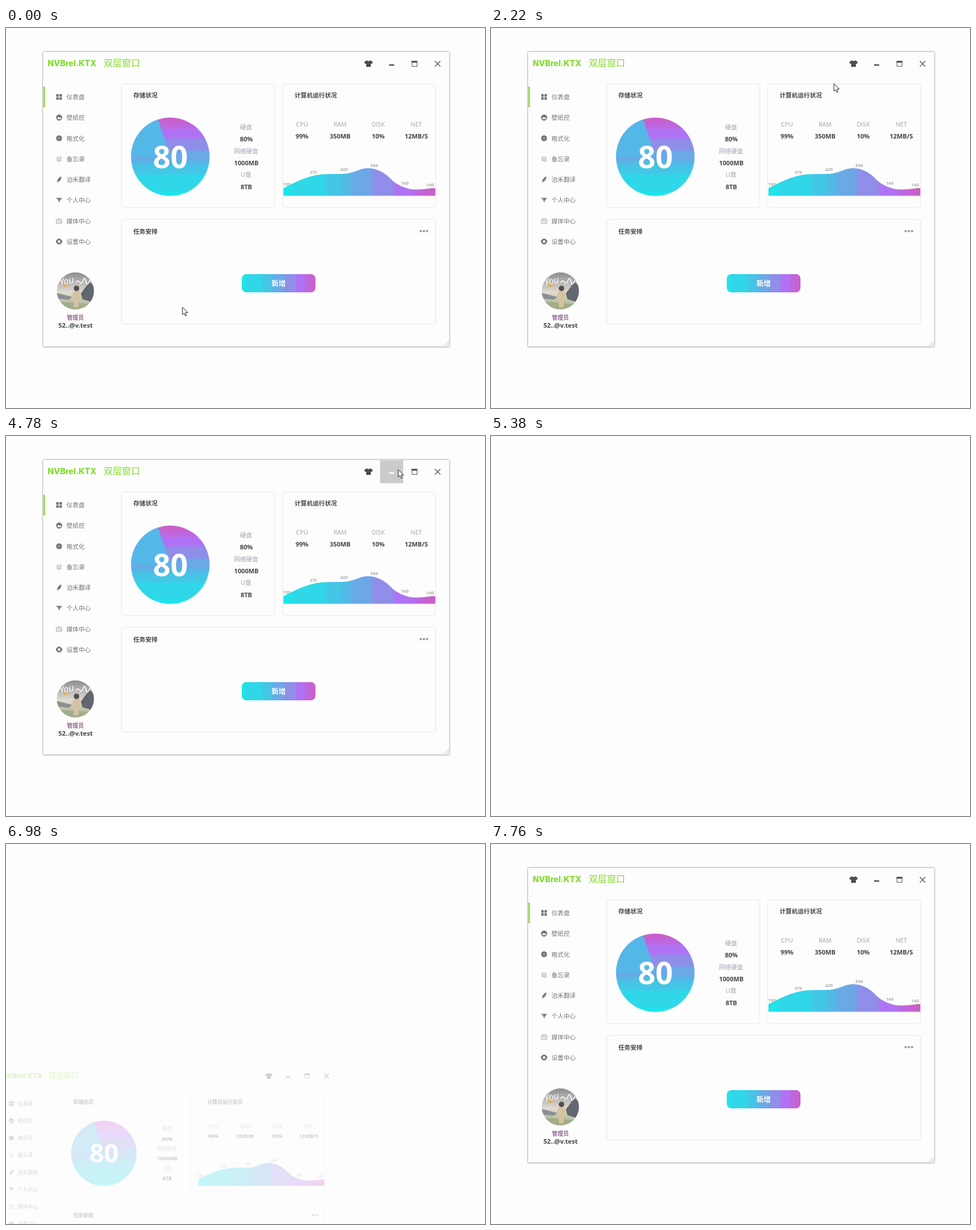
An HTML page that plays this animation: 839x667 px, repeating every 8 s.

```html
<!DOCTYPE html>
<html lang="zh-CN">
<head>
<meta charset="utf-8">
<title>Dashboard</title>
<style>
html, body { margin: 0; width: 100%; height: 100%; overflow: hidden; background: #fdfdfd; }
svg { display: block; width: 100%; height: 100%; }
text { font-family: 'Open Sans', 'Noto Sans CJK SC', 'Noto Sans CJK', sans-serif; }
.brand { font: 800 14.2px Inter, sans-serif; fill: #84db2f; }
.title { font-size: 16px; font-weight: 300; fill: #84db2f; }
.menu { font-size: 10.6px; fill: #747474; }
.head { font-size: 10.6px; font-weight: 700; fill: #444; }
.label { font-size: 10.6px; fill: #a2a2b2; text-anchor: middle; }
.value { font-size: 11px; font-weight: 700; fill: #444; text-anchor: middle; }
.tick { font-size: 7.8px; font-weight: 700; fill: #aaa; text-anchor: middle; }
.mid { text-anchor: middle; }
.ico { fill: #777; stroke: none; }
.line { fill: none; stroke: #999; stroke-width: .9; }
</style>
</head>
<body>
<svg id="stage" viewBox="0 0 839 667"></svg>
<script>
const stage = document.getElementById('stage');
const text = (x, y, s, cls, extra = '') => `<text x="${x}" y="${y}" class="${cls}" ${extra}>${s}</text>`;
const rect = (x, y, w, h, fill, extra = '') =>
  `<rect x="${x}" y="${y}" width="${w}" height="${h}" fill="${fill}" ${extra}/>`;
const circle = (x, y, r, fill) => `<circle cx="${x}" cy="${y}" r="${r}" fill="${fill}"/>`;
const path = (d, extra = '') => `<path d="${d}" ${extra}/>`;
const card = (x, y, w, h) => rect(x, y, w, h, '#fdfdfd', 'rx="5" stroke="#efeff0" stroke-width="1.6"');

// colour bands: [end, colour]
const bands = [
  [.06, '#1fe4e9'], [.28, '#2fd7e8'], [.39, '#44c6e6'], [.45, '#53b8e6'], [.58, '#6ba8e6'],
  [.73, '#8f8ee8'], [.857, '#b072f4'], [.936, '#c066dc'], [1, '#c960cb']
];
const stops = bands.map(([end, c], i) => {
  const from = i ? bands[i - 1][0] : 0;
  return `<stop offset="${from + .02}" stop-color="${c}"/><stop offset="${end - .02}" stop-color="${c}"/>`;
}).join('');

const defs = `<defs>
  <linearGradient id="across">${stops}</linearGradient>
  <linearGradient id="up" x1="0" y1="1" x2="0" y2="0">${stops}</linearGradient>
  <linearGradient id="photo" x1="0" y1="0" x2="0" y2="1">
    <stop offset="0" stop-color="#8d8b92"/><stop offset=".3" stop-color="#bdb9b8"/>
    <stop offset=".55" stop-color="#e2ddd2"/><stop offset=".75" stop-color="#c3c3ae"/>
    <stop offset="1" stop-color="#a9b394"/>
  </linearGradient>
  <clipPath id="round"><circle cx="121.5" cy="461.5" r="32.5"/></clipPath>
  <filter id="soft" x="-5%" y="-5%" width="110%" height="110%"><feGaussianBlur stdDeviation="1.3"/></filter>
</defs>`;

const icons = [
  path('M-5-5h4.4v4.4h-4.4zM.6-5H5v4.4H.6zM-5 .6h4.4V5h-4.4zM.6 .6H5V5H.6z', 'class="ico"'),
  circle(0, 0, 5.4, '#777') + path('M-3.8 2.4L-1.4-1.2 .2 .7 1.8-1 3.9 2.4z', 'fill="#fdfdfd"'),
  circle(0, 0, 5.2, '#777') + path('M-3 0H3M0-3V3', 'stroke="#a5a5a5" stroke-width=".9"') + circle(0, 0, 1.3, '#999'),
  path('M-4.3-1.8L0-4 4.3-1.8 0 .4zM-4.3 .5L0 2.6 4.3 .5M-4.3 2.4L0 4.5 4.3 2.4', 'class="line"'),
  path('M4-5.5C0-4-3-1-3 3L-4 5.5-2 4C2 3 4-1 4-5.5z', 'class="ico"'),
  path('M-5.5-4H5.5L1 1V4.5L-1.2 1z', 'class="ico"') + path('M-4-3.2L0 .5', 'stroke="#ddd" stroke-width=".8"'),
  path('M-4.8-2.5H4.8V4.5H-4.8zM-2.2-5L0-2.5 2.2-5M-2.5 0H-.3M-1.4 0V2.7M.8 0L1.9 2.5 3 0', 'class="line"'),
  path('M-2.4-5H2.4L3.2-3.3 5.4-2.2V2.2L3.2 3.3 2.4 5H-2.4L-3.2 3.3-5.4 2.2V-2.2L-3.2-3.3z', 'class="ico"') + circle(0, 0, 2.3, '#fdfdfd')
];
const names = ['仪表盘', '壁纸控', '格式化', '备忘录', '泊禾翻译', '个人中心', '媒体中心', '设置中心'];
const menu = names.map((s, i) => {
  const y = 121 + i * 36.25;
  return `<g transform="translate(93 ${y})">${icons[i]}</g>` + text(106, y + 4, s, 'menu');
}).join('');

const buttons = [
  ['shirt', 635, path('M-3.2-6Q0-3.6 3.2-6L7.6-3 5.6.4 4 -.4V5.5H-4V-.4L-5.6.4-7.6-3z', 'fill="currentColor"')],
  ['min', 675.5, rect(-4.5, 1, 9, 2.4, 'currentColor')],
  ['max', 715.5, path('M-4.5-4.5H4.5V4.5H-4.5z', 'fill="none" stroke="currentColor"') + rect(-5, -5, 10, 3, 'currentColor')],
  ['close', 756, path('M-4.8-4.8L4.8 4.8M4.8-4.8L-4.8 4.8', 'fill="none" stroke="currentColor" stroke-width="1.3"')]
];
const controls = buttons.map(([id, x, icon]) =>
  `<g id="${id}" transform="translate(${x} 62.8)">${rect(-20.2, -20.3, 40.4, 40.4, 'none')}${icon}</g>`).join('');

const stats = [['硬盘', '80%'], ['网络硬盘', '1000MB'], ['U盘', '8TB']].map(([a, b], i) =>
  text(420.5, 178 + i * 41.7, a, 'label') + text(421, 199 + i * 42, b, 'value')).join('');
const meters = [['CPU', '99%'], ['RAM', '350MB'], ['DISK', '10%'], ['NET', '12MB/S']].map(([a, b], i) =>
  text(518.5 + i * 66.7, 173, a, 'label') + text(518.5 + i * 66.7, 194, b, 'value')).join('');
const ticks = [[492, 277, 150], [538.5, 256, 375], [592, 251, 420], [645, 244, 500], [698.5, 275, 160], [743, 277.5, 140]]
  .map(([x, y, v]) => text(x, y, v, 'tick')).join('');

let grip = '';
for (let i = 0; i < 4; i++)
  for (let j = 0; j <= i; j++) grip += rect(774 - j * 2.7, 549 + i * 2.6, 1.2, 1.2, '#aaa');

const storage = card(202.5, 98, 268, 217) + text(223, 122, '存储状况', 'head') +
  circle(287.8, 226, 68.8, 'url(#up)') +
  path('M287.8 226H219A68.8 68.8 0 0 1 266.5 160.6z', 'fill="#54b8e7"') +
  text(288, 245.5, '80', 'mid', 'font-size="53.5" font-weight="700" fill="#fff"') + stats;

const system = card(484.5, 98, 268, 217) + text(505.5, 122, '计算机运行状况', 'head') + meters +
  path('M486 281C504 272 521 263 540 259S574 257 592 256 619 246 634 246 664 254 674 265 703 284 720 283.5 741 281 752 281V294.4H486Z', 'fill="url(#across)"') + ticks;

const tasks = card(202.5, 336, 550, 184) + text(223, 361, '任务安排', 'head') +
  [726.5, 732, 737.5].map(x => circle(x, 356.5, 2.1, '#9a9aaa')).join('') +
  rect(413, 432, 129, 32, 'url(#across)', 'rx="8"') +
  text(477.5, 452.5, '新增', 'mid', 'font-size="12.4" font-weight="700" fill="#fff"');

const user = `<g clip-path="url(#round)">${rect(89, 429, 65, 65, 'url(#photo)')}
  ${path('M131 466L146 446 154 452V482L134 476z', 'fill="#626671"')}
  ${path('M89 465L116 472 110 477 89 475z', 'fill="#8a8f92"')}
  ${path('M89 480L154 485V494H89z', 'fill="#a3ad8b"')}
  ${path('M118 462H129L132 474 128 475 127 490H119L118 475 115 473z', 'fill="#d3c4a2"')}
  ${circle(123.5, 457, 4.8, '#54504e')}${path('M99 449L106 447 109 452 102 455z', 'fill="#dfae55"')}
  ${text(95, 452, 'You', '', 'font-size="16" font-style="italic" fill="#fff" transform="rotate(-12 95 452)"')}
  ${path('M122 447q4-6 7-1t6-3 5 2 7-2', 'fill="none" stroke="#fff" stroke-width="1.6"')}</g>` +
  text(121.5, 511.5, '管理员', 'mid', 'font-size="9.8" fill="#5b1b55"') +
  text(121.8, 526, '52..@v.test', 'mid', 'font-size="11.2" font-weight="700" fill="#444"');

const tip = `<g id="tip">${rect(61, 399, 122.5, 23, '#86dc32', 'rx="2"')}
  ${path('M117.5 422H126.5L122 426.5z', 'fill="#86dc32"')}
  ${text(122, 414.3, '527183046@v.test', 'mid', 'font-size="10.5" font-weight="600" fill="#fff"')}</g>`;

stage.innerHTML = defs +
  `<g id="shadow">${rect(64.5, 41.5, 712.5, 518.5, '#8c8c8c', 'rx="2" filter="url(#soft)"')}</g>
  <g id="win">${rect(65, 42, 711.5, 517.2, '#fdfdfd')}
    ${text(73, 67, 'NVBrel.KTX', 'brand')}${text(171, 67.3, '双层窗口', 'title')}
    ${rect(65.5, 103, 2.5, 36, '#84db2f')}${menu}${controls}${storage}${system}${tasks}${user}${grip}</g>` + tip +
  `<g id="cursor">${path('M0 0V13.2L3 10.4 5 15.2 7.2 14.3 5.2 9.6H9.4z', 'fill="#fff" stroke="#222" stroke-width="1" stroke-linejoin="round"')}</g>`;

const el = id => document.getElementById(id);
const [win, shadow, tipBox, cursor] = ['win', 'shadow', 'tip', 'cursor'].map(el);
const clamp = v => Math.max(0, Math.min(1, v));
const smooth = u => u * u * (3 - 2 * u);
const linear = u => u;

// pointer moves: start, end, steps, from, to, easing
const moves = [
  [650, 1240, 12, [309, 490], [135, 468], smooth],
  [1600, 2330, 16, [135, 468], [648, 60], smooth],
  [2390, 2890, 10, [648, 60], [756, 71], smooth],
  [2980, 3190, 4, [756, 71], [563, 172], smooth],
  [3240, 3580, 8, [563, 172], [158, 677], linear],
  [4330, 4780, 10, [618, 211], [687, 59], smooth],
  [5200, 5380, 5, [687, 59], [300, 700], linear]
];

function pointer(t) {
  const move = moves.filter(m => m[0] <= t).pop();
  if (!move) return moves[0][3];
  const [a, b, n, from, to, ease] = move;
  const u = ease(clamp((Math.floor((t - a) / (b - a) * (n - 1) + 1e-6) + 1) / n));
  return from.map((v, i) => v + (to[i] - v) * u);
}

// window pose: p is the way towards the taskbar
function pose(t) {
  for (const [hide, show, length, far] of [[4990, 6160, 140, .23], [6900, 7610, 150, .43]]) {
    if (t >= hide && t < show) {
      const p = ((Math.floor((t - hide) / 40) + 1) / 3) ** 2;
      return { p, alpha: clamp(1 - .75 * p) };
    }
    if (t >= show && t < show + length) {
      const p = far * (1 - Math.floor((t - show) / 45) * 45 / length) ** 2;
      return { p, alpha: 1 - 1.5 * p };
    }
  }
  return { p: 0, alpha: 1 };
}

function draw(t) {
  const [x, y] = pointer(t);
  const { p, alpha } = pose(t);
  cursor.setAttribute('transform', `translate(${x} ${y})`);
  win.setAttribute('transform', `translate(${-67.9 * p} ${355 * p}) scale(${1 - .168 * p})`);
  win.setAttribute('opacity', alpha);
  win.setAttribute('visibility', alpha ? 'visible' : 'hidden');
  shadow.setAttribute('visibility', p ? 'hidden' : 'visible');
  tipBox.setAttribute('opacity', Math.min(clamp((t - 1000) / 150), clamp((1900 - t) / 150)));
  for (const [id, cx] of buttons) {
    const over = Math.abs(x - cx) < 20.2 && y > 42 && y < 83;
    const g = el(id);
    g.style.color = over ? '#fff' : '#4c4c54';
    g.firstChild.setAttribute('fill', over ? (id === 'close' ? '#f00' : '#cbcbcb') : 'none');
  }
}

const begin = performance.now();
function tick() {
  draw((performance.now() - begin) % 8000);
  requestAnimationFrame(tick);
}
tick();
</script>
</body>
</html>
```
